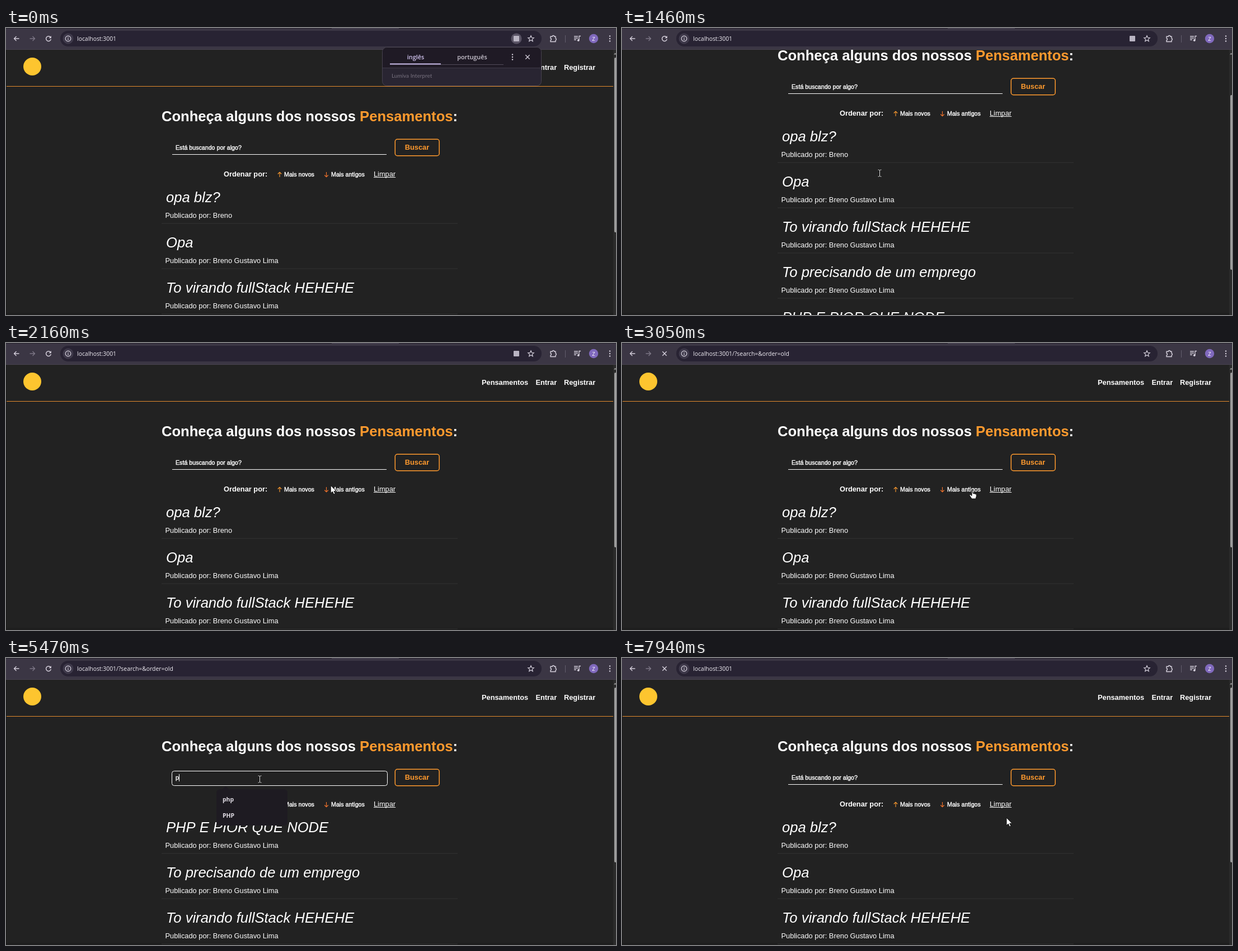
Recreate the animation shown at these times as an HTML page with a canvas. Size 1090 by 514 pixels, loop 8 s.

```html
<!DOCTYPE html>
<html lang="pt-BR">
<head>
<meta charset="utf-8">
<title>Pensamentos</title>
<style>
html, body { margin: 0; width: 100%; height: 100%; overflow: hidden; background: #222; }
canvas { display: block; }
</style>
</head>
<body>
<canvas id="stage" width="1090" height="514"></canvas>
<script>
const c = document.getElementById('stage').getContext('2d');
const LOOP = 8000, STEP = 70, PHASE = 60;
const ORANGE = '#ff9a2e', LINE = '#e48b2d', WHITE = '#fff', PAGE = '#222', ICON = '#d5d0dc';
const SANS = '"Liberation Sans", Arial, sans-serif';
const UI = '"Open Sans", "Noto Sans", sans-serif';
const BODY = '12.8px ' + SANS, BOLD = 'bold ' + BODY, SMALL = '10.67px ' + SANS;
const HEAD = 'bold 25.6px ' + SANS, TITLE = 'italic 25.6px ' + SANS;

const AUTHOR = 'Breno Gustavo Lima';
const posts = [
  ['opa blz?', 'Breno'],
  ['Opa', AUTHOR],
  ['To virando fullStack HEHEHE', AUTHOR],
  ['To precisando de um emprego', AUTHOR],
  ['PHP E PIOR QUE NODE', AUTHOR]
];
const oldest = [...posts].reverse();
const history = ['php', 'PHP', 'opa', 'node', 'emprego', 'To precisando de um emprego'];

// time, x, y, shape taken from that time on
const pointer = [
  [130, 1040, 14, 'arrow'], [270, 985, 200, 'arrow'], [410, 930, 335, 'arrow'],
  [550, 700, 484, 'arrow'], [690, 524, 420, 'arrow'], [970, 524, 420, 'arrow'],
  [1110, 490, 283, 'arrow'], [1250, 460, 260, 'beam'], [1950, 460, 260, 'beam'],
  [2090, 560, 256, 'arrow'], [2160, 580, 255, 'arrow'], [2230, 596, 259, 'hand'],
  [2500, 622, 263, 'hand'], [2700, 626, 263, 'hand'], [3460, 626, 263, 'hand'],
  [3600, 570, 244, 'arrow'], [3740, 500, 222, 'beam'], [3940, 453, 217, 'beam'],
  [6550, 453, 217, 'beam'], [6620, 460, 213, 'beam'], [6690, 480, 220, 'arrow'],
  [6900, 640, 300, 'arrow'], [7040, 726, 335, 'arrow'], [7250, 690, 292, 'hand'],
  [7320, 687, 286, 'hand'], [7600, 687, 286, 'arrow']
];
const scrolling = [[1320, 0], [1460, 109], [1670, 290], [1810, 290], [2090, 0]];

function sample(keys, t) {
  if (t < keys[0][0]) return keys[0];
  const i = keys.findLastIndex(k => k[0] <= t), a = keys[i], b = keys[i + 1];
  if (!b) return a;
  const p = (t - a[0]) / (b[0] - a[0]);
  return a.map((v, j) => typeof v === 'number' ? v + (b[j] - v) * p : v);
}

function text(s, x, y, font, color = WHITE, align = 'left') {
  c.font = font;
  c.fillStyle = color;
  c.textAlign = align;
  c.fillText(s, x, y);
  return c.measureText(s).width;
}

// small labels carry a slightly heavier stroke
function label(s, x, y) {
  const w = text(s, x, y, SMALL);
  c.strokeStyle = WHITE;
  c.lineWidth = .4;
  c.strokeText(s, x, y);
  return w;
}

function centered(parts, y, font) {
  c.font = font;
  let x = 542.5 - c.measureText(parts.map(p => p[0]).join('')).width / 2;
  for (const [s, color] of parts) x += text(s, x, y, font, color);
}

function rect(x, y, w, h, color) {
  c.fillStyle = color;
  c.fillRect(x, y, w, h);
}

function round(x, y, w, h, r, fill, stroke, width = 1) {
  c.beginPath();
  c.roundRect(x, y, w, h, r);
  paint(fill, stroke, width);
}

function disc(x, y, r, fill, stroke, width) {
  c.beginPath();
  c.arc(x, y, r, 0, 7);
  paint(fill, stroke, width);
}

function paint(fill, stroke, width = 1) {
  if (fill) { c.fillStyle = fill; c.fill(); }
  if (stroke) { c.strokeStyle = stroke; c.lineWidth = width; c.stroke(); }
}

function path(x, y, d, stroke, width = 1.3, fill) {
  c.save();
  c.translate(x, y);
  const p = new Path2D(d);
  if (fill) { c.fillStyle = fill; c.fill(p); }
  if (stroke) { c.strokeStyle = stroke; c.lineWidth = width; c.stroke(p); }
  c.restore();
}

function dots(x, y) {
  for (const d of [-4.5, 0, 4.5]) disc(x, y + d, 1.2, ICON);
}

const CROSS = 'M-3.7-3.7L3.7 3.7M3.7-3.7L-3.7 3.7';

function toolbar(s) {
  rect(0, 0, 1090, 38, '#3b3644');
  rect(0, 0, 1090, 1, '#25212c');
  rect(582, 0, 120, 1, '#4b4655');
  rect(0, 38, 1090, 1, '#48434f');
  round(97, 5, 860, 28, 14, '#282333');
  path(19, 19, 'M4.5 0H-4.5M-.5-4L-4.5 0L-.5 4', ICON);
  path(47, 19, 'M-4.5 0H4.5M.5-4L4.5 0L.5 4', '#7d7786');
  if (s.loading) path(76, 19, CROSS, ICON, 1.4);
  else {
    path(76, 19, 'M3.6-2.4A4.4 4.4 0 1 0 4.3 1', ICON, 1.4);
    path(76, 19, 'M4.8-5V-.8H.6Z', null, 0, ICON);
  }
  disc(111, 19, 9.5, '#3e394a');
  disc(111, 19, 4.8, null, ICON, 1.2);
  path(111, 19, 'M0-.6V2.8M0-2.8V-1.5', ICON, 1.2);
  text('localhost:3001' + s.query, 127, 23, '500 10.4px ' + UI, '#f0edf4');
  if (s.translatable) {
    if (s.ring) disc(912, 19, 9.5, '#5a5465');
    round(907, 14, 10, 10, 1, '#b9b4c2');
  }
  path(938, 19, 'M0-5.2L1.5-1.7L5.2-1.4L2.4 1.1L3.2 4.8L0 2.8L-3.2 4.8L-2.4 1.1L-5.2-1.4L-1.5-1.7Z', ICON, 1.2);
  path(978, 19, 'M-5-3.7H-1.8A1.8 1.8 0 0 1 1.8-3.7H4V-.5A1.8 1.8 0 0 1 4 3V5.5H-5V3A1.9 1.9 0 0 0-5-.7Z', ICON, 1.4);
  rect(999, 13, 1, 13, '#625c6c');
  path(1020, 19, 'M-5-4H2M-5-1H2M-5 2H-1M4 3V-4.5H7', ICON, 1.3);
  disc(1022.8, 22, 1.9, ICON);
  disc(1050, 19, 8.2, '#8069bd');
  text('Z', 1050, 22.5, '9.5px ' + UI, WHITE, 'center');
  dots(1079, 19);
}

function popup() {
  round(672.5, 34.5, 284, 69, 8, '#292532', '#47424f');
  round(673, 35, 283, 36, [8, 8, 0, 0], '#1f1a25');
  rect(673, 71, 283, 1, '#3e3947');
  text('inglês', 732, 56, '600 10.8px ' + UI, '#d6c8f5', 'center');
  text('português', 833, 56, '600 10.8px ' + UI, '#cbc6d1', 'center');
  rect(686, 63.5, 91, 2, '#cfc0f0');
  rect(777, 65, 112, 1, '#514b59');
  dots(905, 52);
  path(932, 52, CROSS, ICON, 1.3);
  text('Lumiva Interpret', 689, 89, '10px Lato, sans-serif', '#77717f');
}

function field(s, dy) {
  if (s.focus) round(296.5, 202.5, 385, 26, 4, null, WHITE);
  else rect(297, 226 + dy, 383, 1, WHITE);
  const w = label(s.typed || 'Está buscando por algo?', 303, 218 + dy);
  if (s.caret) rect(303 + (s.typed ? Math.round(w) : 0), 208, 1, 13, WHITE);
  round(695.3, 199.3 + dy, 78.9, 29.4, 4, null, ORANGE, 1.5);
  text('Buscar', 734.5, 218 + dy, BOLD, ORANGE, 'center');
}

function page(s) {
  const dy = s.search ? 30 : 0;
  rect(0, 38, 1090, 476, PAGE);
  rect(0, 510, 1090, 4, '#1e1e1e');
  c.save();
  c.beginPath();
  c.rect(0, 39, 1085, 475);
  c.clip();
  c.translate(0, -s.scroll);

  disc(47, 69, 16, '#fdc52f');
  text('Pensamentos', 850, 75, BOLD);
  text('Entrar', 946.5, 75, BOLD);
  text('Registrar', 997, 75, BOLD);
  rect(0, 104, 1085, 1, LINE);

  if (s.search) {
    centered([['Você está buscando por: ', WHITE], ['php', ORANGE]], 167, HEAD);
    centered([['Foram encontrados ', WHITE], ['1', ORANGE], [' pensamento(s)', WHITE]], 210, BODY);
  } else {
    centered([['Conheça alguns dos nossos ', WHITE], ['Pensamentos', ORANGE], [':', WHITE]], 167, HEAD);
  }
  field(s, dy);

  text('Ordenar por:', 389, 266 + dy, BOLD);
  path(489, 262.5 + dy, 'M0 4.5V-4M-3.3-1L0-4.2L3.3-1', ORANGE, 1.1);
  label('Mais novos', 497, 266 + dy);
  path(572.5, 262.5 + dy, 'M0-4.5V4M-3.3 1L0 4.2L3.3 1', '#f8752c', 1.1);
  label('Mais antigos', 581, 266 + dy);
  const w = text('Limpar', 657, 266 + dy, BODY);
  rect(657, 267 + dy, w, 1, WHITE);

  s.posts.forEach(([title, author], i) => {
    const y = i * 81 + dy;
    text(title, 286, 312 + y, TITLE);
    text('Publicado por: ' + author, 284.5, 340 + y, BODY);
    rect(278, 349.5 + y, 529, 1, '#333');
  });
  rect(0, 448 + dy + 81 * (s.posts.length - 1), 1085, 1, LINE);
  c.restore();

  rect(1085, 39, 5, 475, '#2b2b2b');
  path(1088.5, 46, 'M-2.5 1.5L0-1.5L2.5 1.5Z', null, 0, '#9a9a9a');
  round(1087, 53 + s.scroll * .614, 4, s.search ? 444 : 313, 2, '#9f9f9f');
  rect(0, 0, 1, 514, '#151515');
}

function suggestions(rows) {
  const all = rows > 2;
  path(392.5, 236, 'M-7 0L0-6L7 0Z', null, 0, '#1e1b22');
  round(376, 235, all ? 187 : 127, all ? 184 : 65, 6, '#1e1b22');
  for (let i = 0; i < rows; i++) {
    text(history[i], 387, 257 + i * 28.7, 'bold 10.4px ' + UI, '#e4e0e8');
  }
}

function cursor(t) {
  if (t < pointer[0][0]) return;
  const [, x, y, shape] = sample(pointer, t);
  if (shape === 'beam') {
    const d = 'M-3-6H-1L0-5L1-6H3M0-5V5M-3 6H-1L0 5L1 6H3';
    path(x + .5, y, d, '#111', 2.6);
    path(x + .5, y, d, '#e8e8e8', 1);
  } else if (shape === 'hand') {
    path(x, y, 'M-1 1Q0-1 1 1V6L6 7.5Q8 8 7.5 11L6 16H-1L-5 10Q-5.5 8-3.5 8.5L-1 10.5Z', '#111', 1, WHITE);
  } else {
    path(x, y, 'M0 0V14L3.2 11L5.5 16L8 15L5.7 10.2H10Z', '#111', 1, WHITE);
  }
}

function stateAt(t) {
  const within = (a, b) => t >= a && t < b;
  const sorted = within(3120, 6010), search = within(6010, 7660);
  const focus = within(4270, 6010);
  const typed = search || t >= 5670 && focus ? 'php'
    : within(5600, 5670) ? 'ph' : within(5340, 5600) ? 'p' : '';
  // the page scrolls in whole steps and rests between them
  const held = Math.floor((t - PHASE) / STEP) * STEP + PHASE;
  return {
    search, focus, typed,
    caret: focus && !within(4880, 5340),
    rows: within(4340, 5470) ? 6 : within(5470, 5870) ? 2 : 0,
    posts: search ? [posts[4]] : sorted ? oldest : posts,
    query: within(3050, 5940) ? '/?search=&order=old' : within(5940, 7590) ? '/?search=php' : '',
    loading: within(2980, 3390) || within(5870, 6220) || t >= 7450,
    translatable: t < 3050,
    ring: t < 830,
    popup: t < 480,
    scroll: within(1320, 2090) ? Math.round(sample(scrolling, held)[1]) : 0
  };
}

function draw(t) {
  const s = stateAt(t);
  page(s);
  toolbar(s);
  if (s.popup) popup();
  if (s.rows) suggestions(s.rows);
  cursor(t);
}

const start = performance.now();
function tick() {
  draw((performance.now() - start) % LOOP);
  requestAnimationFrame(tick);
}
tick();
</script>
</body>
</html>
```
